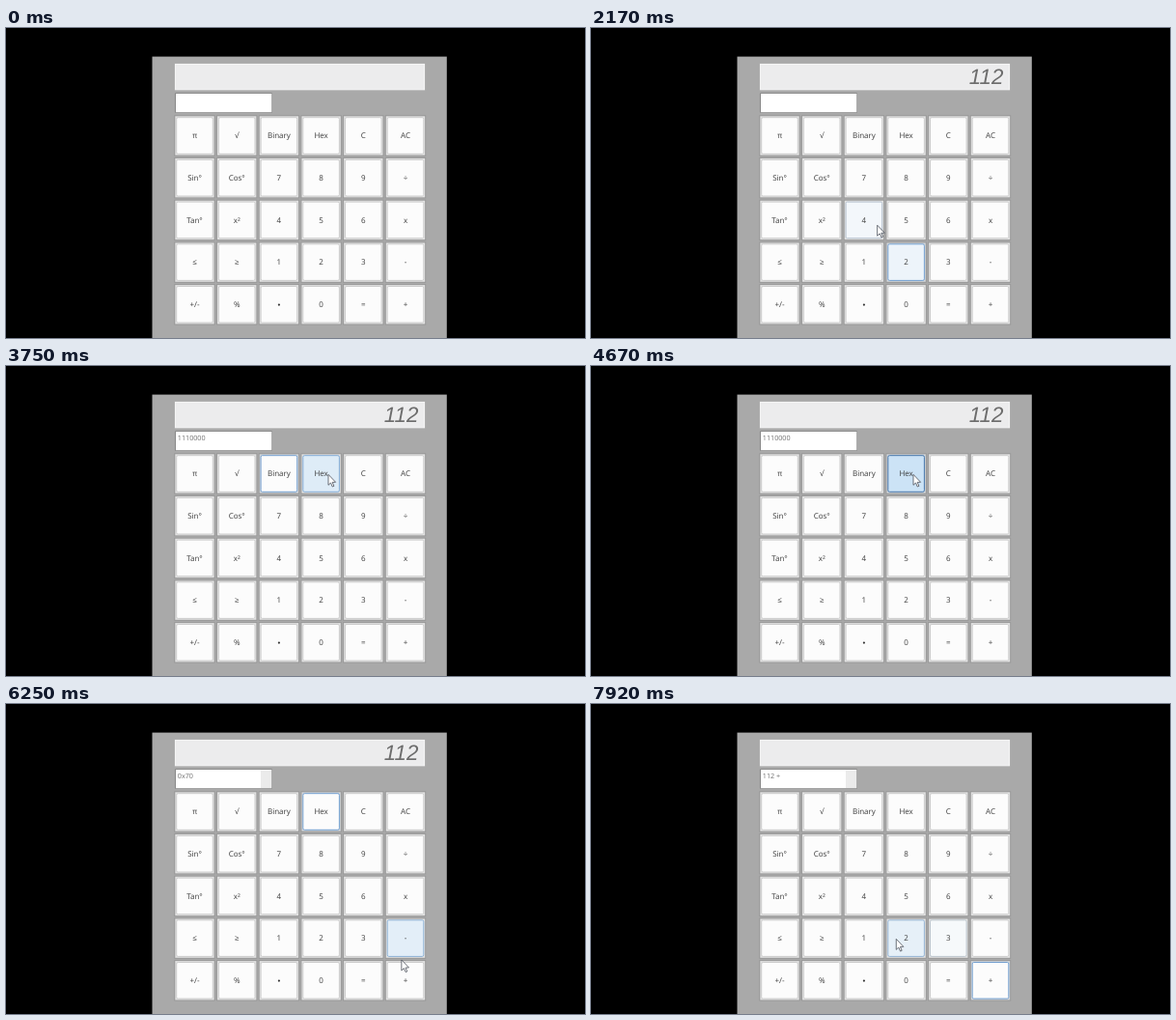
Animation of 600x321 px, one loop 8 s. Source, as an HTML page with a canvas:

```html
<!DOCTYPE html>
<html lang="en">
<head>
<meta charset="utf-8">
<title>Calculator</title>
<style>
html, body { margin: 0; width: 100%; height: 100%; overflow: hidden; background: #000; }
canvas { display: block; width: 600px; height: 321px; }
</style>
</head>
<body>
<canvas id="stage"></canvas>
<script>
const W = 600, H = 321, LOOP = 8000, STEP = 1000 / 12, FADE = 300;
const canvas = document.getElementById('stage');
const dpr = window.devicePixelRatio || 1;
canvas.width = W * dpr;
canvas.height = H * dpr;
const ctx = canvas.getContext('2d');
ctx.scale(dpr, dpr);
ctx.textRendering = 'geometricPrecision';

const UI = '"Open Sans", "Noto Sans", sans-serif';
const PITCH = 43.7, SIZE = 41, LEFT = 175, TOP = 91;
const keys = 'π √ Binary Hex C AC Sin° Cos° 7 8 9 ÷ Tan° x² 4 5 6 x ≤ ≥ 1 2 3 - +/- % • 0 = +'
  .split(' ')
  .map((label, i) => ({
    label,
    x: LEFT + (i % 6) * PITCH,
    y: TOP + Math.floor(i / 6) * PITCH
  }));

// Each move starts where the one before it ended; via bends the curve
const entry = { x: 420, y: 235 };
const moves = [
  { from: 320, to: 640, x: 289, y: 243 },
  { from: 1230, to: 1520, x: 322, y: 243 },
  { from: 1790, to: 2980, x: 284, y: 114, via: [266, 170] },
  { from: 3290, to: 3570, x: 334, y: 112 },
  { from: 5080, to: 6400, x: 416, y: 277 },
  { from: 7220, to: 7920, x: 316, y: 243, via: [372, 252] }
];
const presses = [
  { label: '1', from: 740, to: 860, total: '1' },
  { label: '1', from: 1070, to: 1180, total: '11' },
  { label: '2', from: 1660, to: 1780, total: '112' },
  { label: 'Binary', from: 2990, to: 3200, note: '1110000' },
  { label: 'Hex', from: 4660, to: 4900, note: '0x70' },
  { label: '+', from: 6740, to: 7000, total: '', note: '112 +' }
];
const LAG = 82;

const clamp = v => Math.max(0, Math.min(1, v));
const ease = k => (k + k * k * (3 - 2 * k)) / 2;
const mix = (a, b, k) => a.map((v, i) => v + (b[i] - v) * k);
const rgb = c => `rgb(${c.map(Math.round).join(',')})`;

// Most recent value of a press field, shown shortly after the press
function shown(field, t) {
  const last = presses.filter(p => field in p && p.from + LAG <= t).pop();
  return last ? last[field] : '';
}

function pointer(t) {
  const i = moves.findLastIndex(m => m.from <= t);
  if (i < 0) return null;
  const a = i ? moves[i - 1] : entry, b = moves[i];
  const k = ease(clamp((t - b.from) / (b.to - b.from)));
  const [vx, vy] = b.via || [(a.x + b.x) / 2, (a.y + b.y) / 2];
  const curve = (p, q, r) => (1 - k) ** 2 * p + 2 * k * (1 - k) * q + k * k * r;
  return { x: curve(a.x, vx, b.x), y: curve(a.y, vy, b.y) };
}

function inside(key, p) {
  return p && p.x >= key.x && p.x < key.x + SIZE && p.y >= key.y && p.y < key.y + SIZE;
}

// Share of the recent past spent over the key, which fades linearly in and out
function hoverLevel(key, t) {
  const n = 20;
  let hits = 0;
  for (let i = 0; i < n; i++) {
    if (inside(key, pointer(t - (i + 0.5) * FADE / n))) hits++;
  }
  return hits / n;
}

function pressLevel(key, t) {
  return Math.max(0, ...presses.map(p =>
    p.label !== key.label || t < p.from ? 0 : clamp(1 - (t - p.to) / FADE)));
}

function focused(key, t) {
  const last = presses.filter(p => p.from <= t).pop();
  return last && last.label === key.label;
}

function box(x, y, w, h, fill) {
  ctx.fillStyle = fill;
  ctx.fillRect(x, y, w, h);
}

function text(str, x, y, font, color, align) {
  ctx.font = font;
  ctx.fillStyle = color;
  ctx.textAlign = align;
  ctx.fillText(str, x, y);
}

function drawKey(key, t) {
  const { x, y, label } = key;
  const hover = hoverLevel(key, t), press = pressLevel(key, t), focus = focused(key, t);
  const fill = mix(mix([252, 252, 252], [222, 236, 247], hover), [204, 227, 246], press);
  const rest = focus ? [116, 160, 208] : mix([204, 204, 204], [130, 172, 214], hover);
  const edge = mix(rest, [70, 118, 170], press);

  box(x - 0.7, y - 0.7, SIZE + 1.4, SIZE + 1.4, '#989898');
  box(x + 0.3, y + 0.3, SIZE - 0.6, SIZE - 0.6, focus ? '#d2d6da' : '#e2e2e2');
  ctx.beginPath();
  ctx.roundRect(x + 1.7, y + 1.7, SIZE - 3.4, SIZE - 3.4, 1.5);
  ctx.fillStyle = rgb(fill);
  ctx.fill();
  ctx.lineWidth = 1;
  ctx.strokeStyle = rgb(edge);
  ctx.stroke();

  const cx = x + SIZE / 2, cy = y + SIZE / 2;
  if (label === '•') {
    ctx.beginPath();
    ctx.arc(cx, cy + 0.3, 1.1, 0, Math.PI * 2);
    ctx.fillStyle = '#333';
    ctx.fill();
  } else {
    text(label, cx, cy + 2.7, '8px ' + UI, '#3c3c3c', 'center');
  }
}

function drawPointer(p) {
  if (!p) return;
  ctx.save();
  ctx.translate(p.x, p.y + 0.3);
  const arrow = new Path2D('M0 0V11L2.5 8.7L4.3 12.7L5.9 12L4.2 8.1L7.6 8Z');
  ctx.fillStyle = '#fff';
  ctx.fill(arrow);
  ctx.lineWidth = 0.8;
  ctx.strokeStyle = '#4a4f58';
  ctx.stroke(arrow);
  ctx.restore();
}

function draw(t) {
  box(0, 0, W, H, '#000');
  box(151.5, 29.6, 305.3, 292, '#a9a9a9');

  box(174.7, 36.7, 259.6, 28, '#bcbcbc');
  box(175, 37, 259, 27.2, '#f4f4f4');
  box(176, 38, 257, 25.5, '#ececed');
  text(shown('total', t), 427.3, 58.3, 'italic 22.3px "Liberation Sans", Arial, sans-serif', '#6c6c6c', 'right');

  box(175.2, 67.3, 100.6, 20.4, '#808080');
  box(176, 68, 99.3, 19.2, '#fff');
  const note = shown('note', t);
  if (note && note !== '1110000') box(264, 68.5, 11, 18.5, '#ebebeb');
  text(note, 177.8, 76.5, '7.2px ' + UI, '#6c6c6c', 'left');

  keys.forEach(key => drawKey(key, t));
  drawPointer(pointer(t));
}

const start = performance.now();
function frame(now) {
  const t = Math.max(0, now - start) % LOOP;
  draw(Math.floor((t + 4) / STEP) % 96 * STEP);
  requestAnimationFrame(frame);
}
draw(0);
requestAnimationFrame(frame);
</script>
</body>
</html>
```
